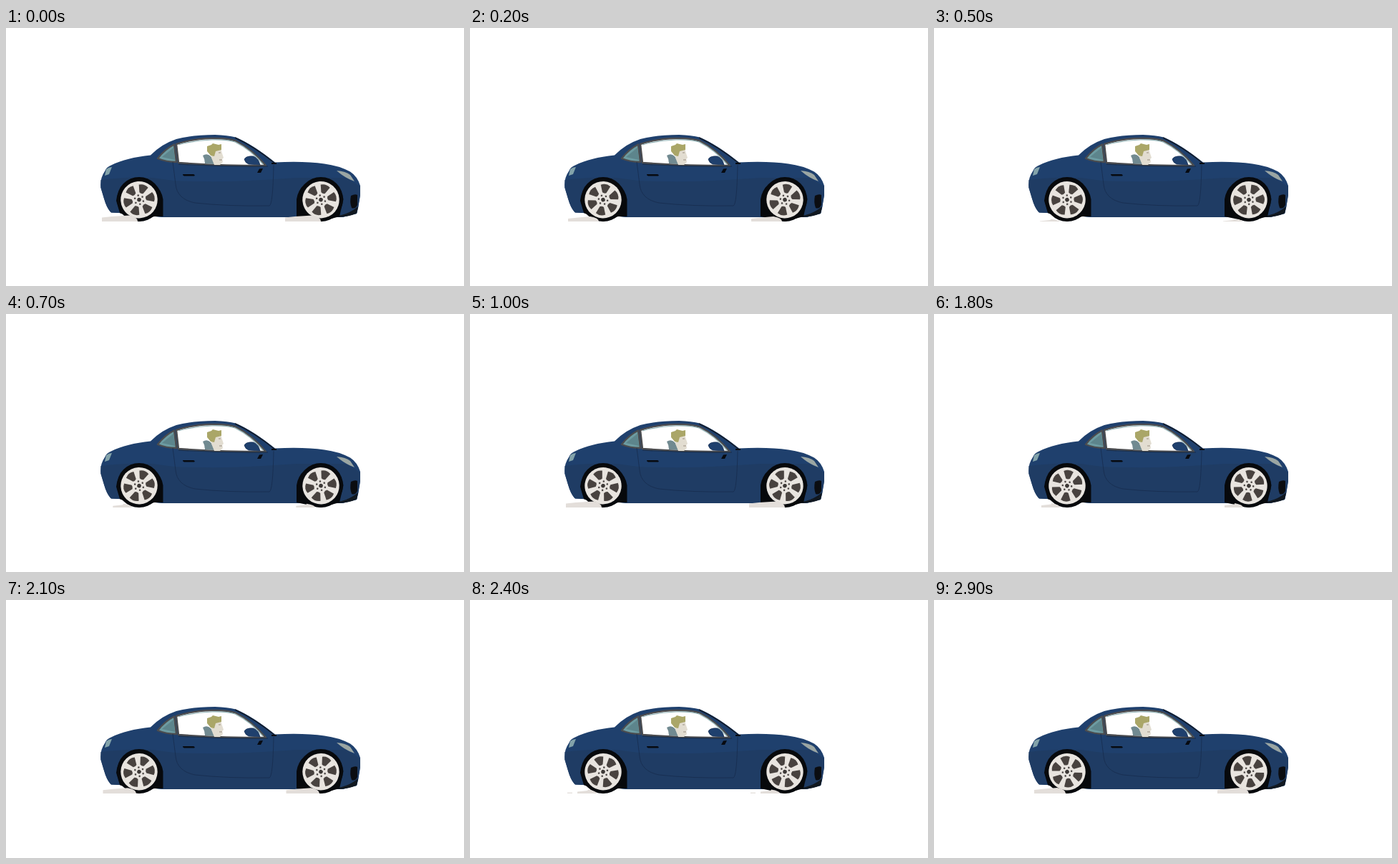
These frames come from a looping animation (640x360 px, 3 s). An HTML page:

```html
<!DOCTYPE html>
<html lang="en">
<head>
<meta charset="utf-8">
<title>Driving car</title>
<style>
  html, body { margin: 0; height: 100%; overflow: hidden; background: #fff; }
  svg { display: block; width: 640px; height: 360px; }
</style>
</head>
<body>
<svg viewBox="0 0 640 360">
  <defs>
    <g id="gap"><path d="M-2.8 -10L-6.8 -20Q0 -24 6.800 -20L2.800 -10Q0 -8.500 -2.800 -10Z" fill="#48423f"/></g>
    <g id="rim">
      <circle r="25.7" fill="#e8e4df"/>
      <g id="gaps"></g>
      <circle r="2.8" fill="#3d3937"/>
    </g>
    <g id="puff">
      <path class="cloud" fill="#e3deda"/>
      <path class="wisp" d="M136 268.500H143V270H136Z" fill="#e6e2df"/>
    </g>
  </defs>

  <!-- body -->
  <path fill="#1f406d" d="M158 258L147 257.500Q141 252 137 238L132.500 223Q131 210 138 200Q140 194 148 191Q168 181 202 177.500Q217 162 238 155Q262 149 292 149Q310 149.500 321 152.500Q344 162 376 187.500Q417 185.500 445 189.500Q465 192 481 200.500Q491 207 495 220V233L492 251L490 259L470 264H219L200 262Z"/>
  <path fill="#1f3c64" d="M132.500 212Q170 207 205 209L235 213Q310 216 374 211L407 209H475L495 221V233L492 251L490 259L470 264H219L158 258L147 257.500Q141 252 137 238L132.500 223Z"/>
  <path fill="#111820" d="M463 262Q479 260 492 249L490 258.500Q480 263 465 264Z"/>
  <path fill="#0b0d11" d="M482 234Q488 231 491 233V247Q488 253 483 251Q480 243 482 234Z"/>
  <path fill="#83a3aa" d="M138 206L140 197Q144 194 148 194L144 204Z"/>
  <path fill="#9ba6a3" d="M462 199Q475 200 481 205L487 214Q473 209 462 199Z"/>

  <!-- windows -->
  <g stroke="#4b4c4f" stroke-width="2.400" stroke-linejoin="round">
    <path fill="#fff" d="M238 162Q260 154.500 288 154Q309 153.500 321 157.500Q344 169 363 192Q300 192 241 188Z"/>
    <path fill="#6d9ca2" d="M212 182Q222 169 235 162.500L238 187Q224 187 212 182Z"/>
  </g>
  <path fill="none" stroke="#8fb1b4" stroke-width="1.200" d="M241 163Q262 157 288 156Q308 155.500 320 159Q342 170 359 190"/>
  <path fill="#5d858c" d="M218 180L234 167L236 184Z"/>
  <path fill="none" stroke="#111a29" stroke-width="1.600" d="M320 153Q348 166 376 189"/>

  <!-- driver -->
  <path fill="#718a91" d="M275 178Q281 174 286 179L293 190L278 189Q278 183 275 178Z"/>
  <path fill="#e2ddd1" d="M287 172L300 168L302 175L304 181L302 183L303 187L299 191H291L287 181Z"/>
  <path fill="#aaa668" d="M281 165L287 163L289 161L297 163L301 162V170L293 172L291 179L286 178L281 172Z"/>
  <path fill="none" stroke="#8a7d70" stroke-width=".8" d="M297 174H300M298 184H302"/>

  <!-- door and mirror -->
  <path fill="none" stroke="#172d4e" stroke-width=".8" d="M233 187Q235 202 237 218Q239 239 264 244Q310 249 368 248Q373 247 374 191"/>
  <path fill="none" stroke="#182c48" stroke-width="1.200" d="M241 190Q305 194 366 193"/>
  <path fill="#1f406d" stroke="#162e53" stroke-width=".7" d="M333 183Q336 178 346 179Q353 182 355 191L339 190Q334 188 333 183Z"/>
  <path fill="#070a10" d="M351 202L354 196.500L359 196L356 202ZM247 204H262Q265 205 263 206.500H249Q247 206 247 204ZM371 188H378V190H371Z"/>

  <!-- wheels -->
  <g fill="#07090c">
    <path d="M154 241A33 33.500 0 0 1 219.500 239V263H207L186 270L159 258Z"/>
    <path d="M406 263V239A33 33 0 0 1 471.500 239L466 263L440 270Z"/>
    <circle cx="186" cy="239" r="31"/>
    <circle cx="440" cy="239" r="31"/>
  </g>
  <g transform="translate(186 239.700)"><use class="rim" href="#rim"/></g>
  <g transform="translate(440 239.700)"><use class="rim" href="#rim"/></g>

  <use href="#puff"/>
  <use href="#puff" x="256"/>
</svg>
<script>
  const $ = s => document.querySelector(s);
  const rims = document.querySelectorAll('.rim');
  const spokes = 6;

  $('#gaps').innerHTML = Array.from({ length: spokes }, (_, i) => {
    const turn = i * 360 / spokes;
    return `<use href="#gap" transform="rotate(${turn})"/>
      <circle cy="-6.2" r="1.3" fill="#4d4846" transform="rotate(${turn + 30})"/>`;
  }).join('');

  // phase in tenths, left edge, top edge, right edge
  const keys = [
    [0, 134, 261.5, 184], [2, 137, 263, 180], [4, 150, 264.5, 177],
    [5, 148, 266.5, 176], [8, 150, 264, 176], [9, 140, 262, 184], [10, 134, 261.5, 184]
  ];

  function puffAt(phase) {
    const i = keys.findIndex(k => k[0] > phase);
    const a = keys[i - 1], b = keys[i];
    const u = (phase - a[0]) / (b[0] - a[0]);
    return a.map((v, n) => v + (b[n] - v) * u).slice(1);
  }

  function draw(now) {
    const step = Math.floor(now % 3000 / 100);
    const phase = step % 10;
    rims.forEach(r => r.setAttribute('transform', `rotate(${18 + step * 26})`));

    const [left, top, right] = puffAt(phase);
    $('.cloud').setAttribute('d',
      `M${left} 270V${top + 3}L${left + 14} ${top + 1.5}L${right - 12} ${top}Q${right} ${top + 2} ${right} 270Z`);
    $('.wisp').style.display = phase >= 3 && phase <= 4 ? '' : 'none';
    requestAnimationFrame(draw);
  }
  draw(0);
</script>
</body>
</html>
```
